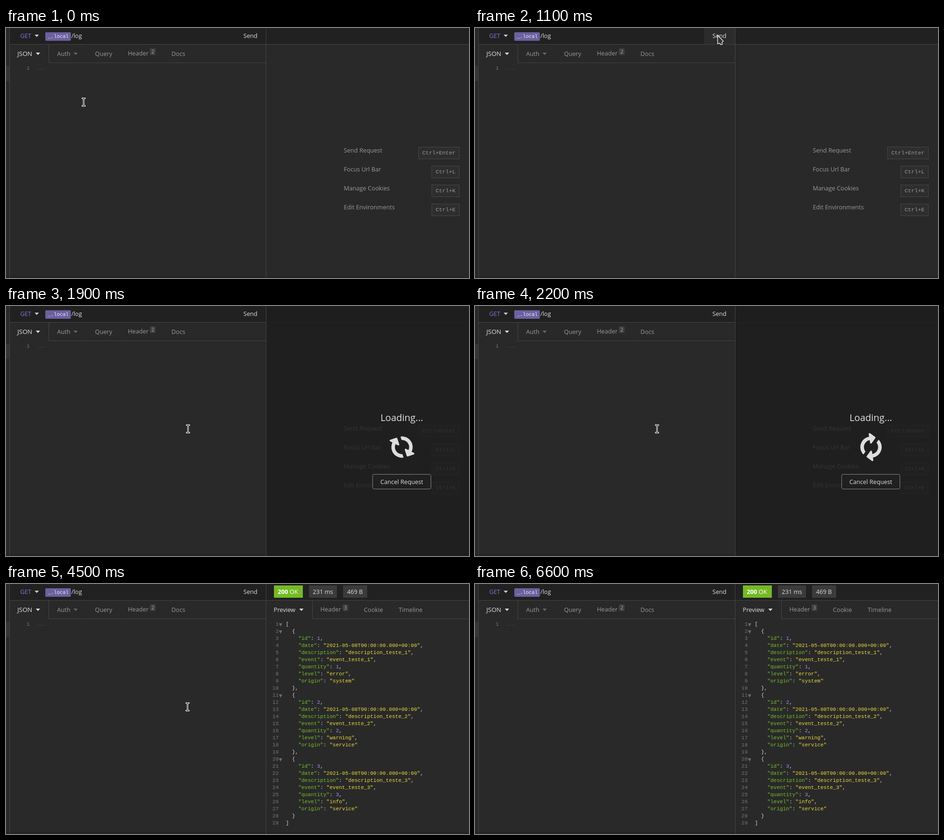
These frames come from a looping animation (978x528 px, 6700 ms). An HTML page:

```html
<!DOCTYPE html>
<html lang="en">
<head>
<meta charset="utf-8">
<title>Request log</title>
<style>
  html, body { margin: 0; height: 100%; overflow: hidden; background: #292929; }
  svg { display: block; width: 100vw; height: 100vh; }
  text { font: 12.7px "Open Sans", "Noto Sans", sans-serif; white-space: pre; }
  .mono { font: 11px "Liberation Mono", "Noto Sans Mono", monospace; }
  .key { fill: #75c02a; }
  .str { fill: #e8d93c; }
  .num { fill: #a48dfb; }
</style>
</head>
<body>
<svg id="stage" viewBox="0 0 978 528"></svg>
<script>
const LOOP = 6700, TICK = 100;
const LINE = '#454545', DIM = '#999', LIGHT = '#e0e0e0';
const stage = document.getElementById('stage');

function add(parent, tag, attrs = {}, content = '') {
  const el = document.createElementNS('http://www.w3.org/2000/svg', tag);
  for (const name in attrs) el.setAttribute(name, attrs[name]);
  el.textContent = content;
  return parent.appendChild(el);
}
const group = (parent = stage) => add(parent, 'g');
const rect = (g, x, y, width, height, fill, more) =>
  add(g, 'rect', { x, y, width, height, fill, ...more });
const path = (g, d, fill, more) => add(g, 'path', { d, fill, ...more });
const label = (g, x, y, str, fill = DIM, more) => add(g, 'text', { x, y, fill, ...more }, str);
const mono = (g, x, y, str, fill, more) => label(g, x, y, str, fill, { class: 'mono', ...more });
const caret = (g, x, y, fill) => path(g, `M${x} ${y}h9l-4.5 5z`, fill);
const show = (el, on) => el.setAttribute('display', on ? 'inline' : 'none');

function badge(g, x, str) {
  rect(g, x, 43, 12, 14, '#404040', { rx: 2 });
  label(g, x + 6, 54, str, '#aaa', { 'text-anchor': 'middle', style: 'font-size:10px' });
}

// Tab strip: outline of the active tab, then an underline with small gaps
function strip(g, x, end, gaps) {
  rect(g, x, 35, 1, 39, LINE);
  let from = x;
  for (const stop of [...gaps, end]) {
    rect(g, from, 73, stop - from, 1, LINE);
    from = stop + 1;
  }
}

// Window frame
rect(stage, 0, 0, 978, 528, '#292929');
rect(stage, 8, 0, 970, 34, '#212121');
rect(stage, 0, 80, 7, 32, '#353535');
rect(stage, 0, 524, 978, 4, '#242424');
rect(stage, 8, 34, 970, 1, LINE);
rect(stage, 7, 0, 1, 528, LINE);

// Request pane
const sendHover = rect(stage, 484, 0, 65, 34, '#2c2c2c');
const methodHover = rect(stage, 8, 0, 75, 34, '#2c2c2c');
label(stage, 30, 21, 'GET', '#8674d8');
caret(stage, 60.5, 14, '#ccc');
rect(stage, 83, 9, 54, 18, '#6c60a0', { rx: 2 });
mono(stage, 88.5, 21, '_.local', '#eee', { style: 'font-size:10.4px' });
label(stage, 138, 21, '/log', '#ddd');
label(stage, 501.5, 21, 'Send', '#ddd');

strip(stage, 90, 549, [171, 241, 333]);
label(stage, 24, 59, 'JSON', LIGHT, { style: 'font-size:13.4px' });
caret(stage, 63, 52, LIGHT);
label(stage, 108, 59, 'Auth');
caret(stage, 142.5, 52, '#666');
label(stage, 188, 59, 'Query');
label(stage, 257.5, 58, 'Header');
badge(stage, 304, '2');
label(stage, 349.5, 59, 'Docs');
mono(stage, 50, 88, '1', '#757575', { 'text-anchor': 'end' });
mono(stage, 65, 88, '...', '#5c5c5c');

// Shortcut hints
const hints = group();
[['Send Request', 'Ctrl+Enter'], ['Focus Url Bar', 'Ctrl+L'],
 ['Manage Cookies', 'Ctrl+K'], ['Edit Environments', 'Ctrl+E']].forEach(([name, keys], i) => {
  const y = 251 + 40 * i, w = keys.length * 7.02 + 17;
  label(hints, 713.5, y + 12, name);
  rect(hints, Math.round(958 - w) + .5, y + .5, Math.round(w) - 1, 25, '#2e2e2e', { stroke: '#474747' });
  mono(hints, 949.5, y + 16, keys, DIM, { 'text-anchor': 'end', style: 'font-size:11.7px' });
});

// Loading overlay
const loading = group();
rect(loading, 550, 0, 428, 528, '#1e1e1e', { opacity: .82 });
label(loading, 836, 243, 'Loading...', LIGHT, { 'text-anchor': 'middle', style: 'font-size:20px' });
const spinner = group(loading);
const halfArrow = 'M1536 128v448q0 26-19 45t-45 19h-448q-26 0-45-19t-19-45 19-45l138-138' +
  'q-148-137-349-137-134 0-250 65t-186 179q-11 17-53 117-8 23-30 23h-199q-13 0-22.5-9.5' +
  't-9.5-22.5v-7q65-268 270-434.5t480-166.5q146 0 284 55.5t245 156.5l130-129' +
  'q19-19 45-19t45 19 19 45z';
for (const turn of [0, 180])
  path(spinner, halfArrow, '#ddd', { transform: `rotate(${turn}) scale(.0293) translate(-768 -768)` });
rect(loading, 774.5, 355.5, 123, 31, '#202020', { rx: 3, stroke: '#8a8a8a' });
label(loading, 836, 376, 'Cancel Request', LIGHT, { 'text-anchor': 'middle' });

// Response pane
const response = group();
rect(response, 566, 3, 61, 26, '#75ba24');
const status = label(response, 574, 21, '', '#fff');
add(status, 'tspan', { 'font-weight': 700 }, '200');
add(status, 'tspan', {}, ' OK');
rect(response, 640, 3, 59, 26, '#3b3b3b');
label(response, 648, 21, '231 ms', '#ddd');
rect(response, 712, 3, 51, 26, '#3b3b3b');
label(response, 720.5, 21, '469 B', '#ddd');

strip(response, 647, 978, [739, 813, 897]);
label(response, 565.5, 59, 'Preview', LIGHT);
caret(response, 619.5, 52, LIGHT);
label(response, 664, 58, 'Header');
badge(response, 711, '3');
label(response, 756, 59, 'Cookie');
label(response, 829.5, 59, 'Timeline');

const logs = [['error', 'system'], ['warning', 'service'], ['info', 'service']]
  .map(([level, origin], i) => ({
    id: i + 1,
    date: '2021-05-08T00:00:00.000+00:00',
    description: `description_teste_${i + 1}`,
    event: `event_teste_${i + 1}`,
    quantity: i + 1,
    level,
    origin
  }));
JSON.stringify(logs, null, 2).split('\n').forEach((line, i) => {
  const y = 88 + 15 * i;
  mono(response, 576, y, i + 1, '#757575', { 'text-anchor': 'end' });
  if (/[[{]$/.test(line)) path(response, `M576.5 ${y - 5}h7l-3.5 7z`, '#6c6c6c');
  const row = mono(response, 591, y, '', '#d8d8d8');
  for (const part of line.match(/"[^"]*":?|\d+|[^"\d]+/g)) {
    const isKey = part.endsWith('":');
    const kind = isKey ? 'key' : part[0] === '"' ? 'str' : /\d/.test(part) ? 'num' : '';
    add(row, 'tspan', { class: kind }, isKey ? part.slice(0, -1) : part);
    if (isKey) add(row, 'tspan', {}, ':');
  }
});

rect(stage, 549, 0, 1, 528, LINE);

// Pointers
const arrow = path(stage, 'M.5.5V18.5L4.5 17 7.5 20.5 10.5 19.5 9.5 16 12.5 12.5Z', '#333',
  { stroke: '#fff', 'stroke-width': 1.2, 'stroke-linejoin': 'round' });
const beam = group();
for (const [stroke, width] of [['#fff', 3], ['#111', 1]])
  path(beam, 'M-2.5-8H2.5M0-8V8M-2.5 8H2.5', 'none',
    { stroke, 'stroke-width': width, 'stroke-linecap': 'square' });

// Pointer stops: time, x, y, shape
const stops = [
  [0, 164, 156.5, beam], [100, 214, 147, beam], [200, 257.5, 136.5, beam],
  [400, 295, 122, beam], [500, 380, 92, beam], [600, 455, 59, arrow],
  [700, 493, 41, arrow], [800, 503, 29, arrow], [900, 509, 20, arrow],
  [1000, 511, 16, arrow], [1100, 512, 15, arrow], [1600, 471, 124, arrow],
  [1700, 420, 207, beam], [1800, 391, 250, beam], [1900, 384.5, 259.5, beam],
  [4500, 383.5, 259.5, beam], [4800, 382.5, 259.5, beam],
  [5700, 124.5, 89.5, beam], [6100, 56, -1, arrow], [6600, 0, 0, null]
];

function draw(now) {
  const t = Math.floor(now % LOOP / TICK) * TICK;
  const [, x, y, shape] = stops.filter(s => s[0] <= t).pop();
  for (const p of [arrow, beam]) show(p, p === shape);
  if (shape) shape.setAttribute('transform', `translate(${x} ${y})`);

  show(hints, t < 4500);
  show(loading, t >= 1600 && t < 4500);
  show(response, t >= 4500);
  show(sendHover, t >= 900 && t < 1700);
  show(methodHover, t >= 6100 && t < 6600);
  const angle = (Math.min(t, 2500) - 1500) * .18;
  spinner.setAttribute('transform', `translate(836.5 298) rotate(${angle})`);
}

let start;
function loop(now) {
  start ??= now;
  draw(now - start);
  requestAnimationFrame(loop);
}
draw(0);
requestAnimationFrame(loop);
</script>
</body>
</html>
```
